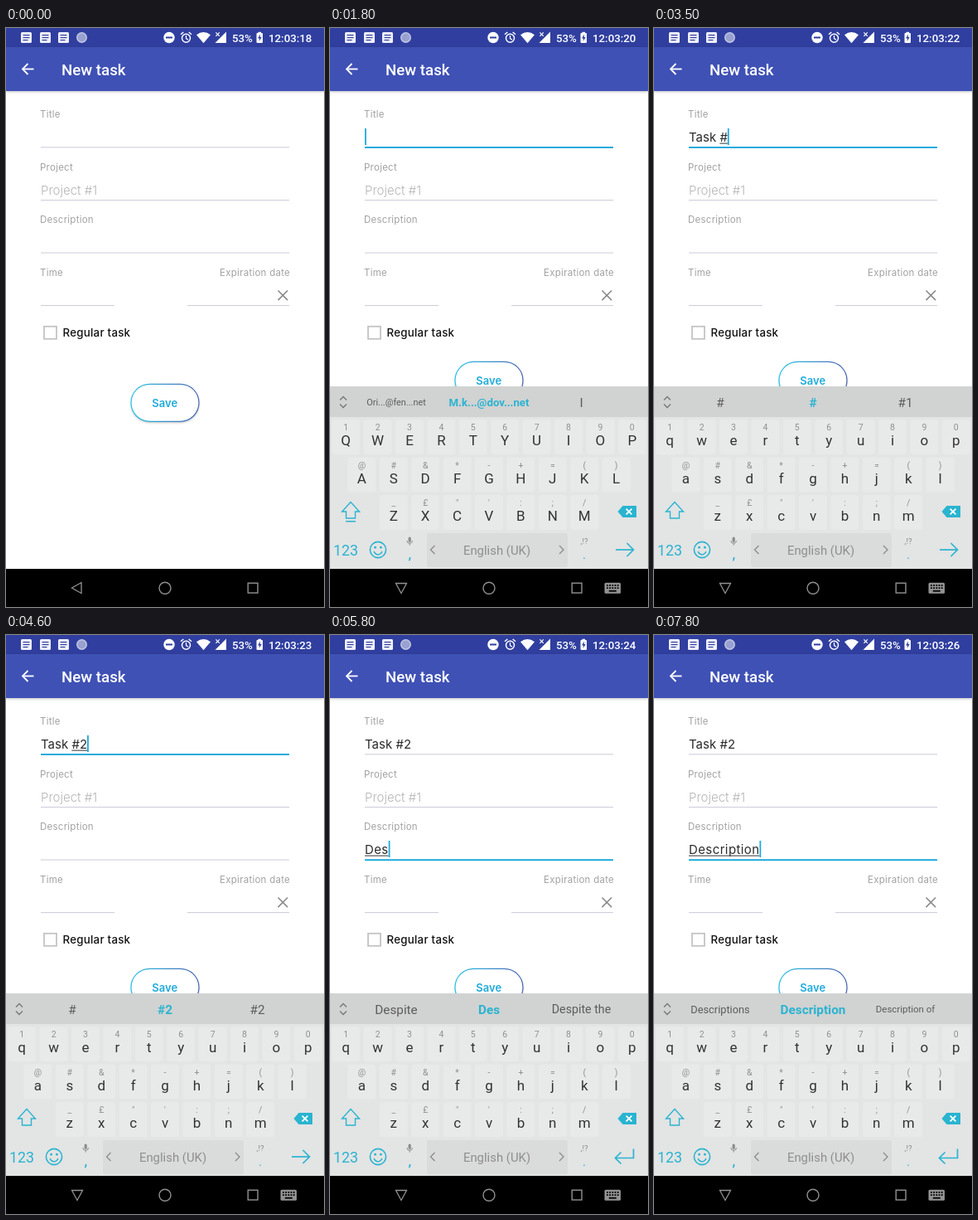
An HTML page with a canvas for the animation above (8000 ms loop, 384x698 px).

```html
<!DOCTYPE html>
<html lang="en">
<head>
<meta charset="utf-8">
<title>New task form</title>
<style>
html, body { margin: 0; width: 100%; height: 100%; overflow: hidden; background: #fff; }
canvas { display: block; width: 384px; height: 698px; }
</style>
</head>
<body>
<canvas id="stage"></canvas>
<script>
const W = 384, H = 698, LOOP = 8000;
const canvas = document.getElementById('stage');
const ctx = canvas.getContext('2d');
const ratio = window.devicePixelRatio || 1;
canvas.width = W * ratio;
canvas.height = H * ratio;

const CYAN = '#2ab4d0', LINE_CYAN = '#1eaadb', GREY = '#8b8b8b';
const FORM = 'Inter, sans-serif', SYS = 'Roboto, sans-serif';
const KEYBOARD_TOP = 432, NAV_TOP = 652;

// time, title, description, left / middle / right suggestion
const STEPS = [
  [0, '', '', '', '', ''],
  [1500, '', '', 'Ori...@fen...net', 'M.k...@dov...net', 'I'],
  [2100, 'T', '', 'The', 'T', 'This'],
  [2400, 'Ta', '', 'Take', 'Ta', 'Take the'],
  [2600, 'Tas', '', 'Task', 'Tas', 'Tasks'],
  [2800, 'Task', '', 'Tasks', 'Task', 'Tasked'],
  [3000, 'Task ', '', 'and', 'is', 'to'],
  [3400, 'Task #', '', '#', '#', '#1'],
  [3600, 'Task #2', '', '#', '#2', '#2'],
  [4900, 'Task #2', '', 'I', 'The', 'This'],
  [5400, 'Task #2', 'D', 'Do', 'D', "Don't"],
  [5600, 'Task #2', 'De', 'Dear', 'De', 'Details'],
  [5800, 'Task #2', 'Des', 'Despite', 'Des', 'Despite the'],
  [6100, 'Task #2', 'Desc', 'Description', 'Desc', 'Describe'],
  [6400, 'Task #2', 'Descr', 'Description', 'Descr', 'Describe'],
  [7000, 'Task #2', 'Descri', 'Description', 'Descri', 'Describe'],
  [7400, 'Task #2', 'Descrip', 'Descriptions', 'Descrip', 'Description of'],
  [7500, 'Task #2', 'Descript', 'Descriptions', 'Descript', 'Description of'],
  [7600, 'Task #2', 'Descripti', 'Descriptions', 'Descripti', 'Description of'],
  [7700, 'Task #2', 'Descriptio', 'Descriptions', 'Descriptio', 'Description of'],
  [7800, 'Task #2', 'Description', 'Descriptions', 'Description', 'Description of']
];
const TICKS = [200, 1300, 2300, 3300, 4400, 5400, 6300, 7400];

const last = (list, test) => list.filter(test).pop();

function rect(x, y, w, h, color) {
  ctx.fillStyle = color;
  ctx.fillRect(x, y, w, h);
}

function text(s, x, y, font, color, align = 'left', spacing = 0) {
  ctx.font = font;
  ctx.letterSpacing = spacing + 'px';
  ctx.textAlign = align;
  ctx.fillStyle = color;
  ctx.fillText(s, x, y);
}

function path(points, close) {
  ctx.beginPath();
  points.forEach(([x, y]) => ctx.lineTo(x, y));
  if (close) ctx.closePath();
}

function stroke(points, color, width = 1.5, close = false) {
  path(points, close);
  ctx.strokeStyle = color;
  ctx.lineWidth = width;
  ctx.stroke();
}

function fill(points, color) {
  path(points, true);
  ctx.fillStyle = color;
  ctx.fill();
}

function arc(x, y, r, from = 0, to = Math.PI * 2) {
  ctx.beginPath();
  ctx.arc(x, y, r, from, to);
}

function disc(x, y, r, color) {
  arc(x, y, r);
  ctx.fillStyle = color;
  ctx.fill();
}

function ring(x, y, r, color, width, from, to) {
  arc(x, y, r, from, to);
  ctx.strokeStyle = color;
  ctx.lineWidth = width;
  ctx.stroke();
}

function cross(x, y, r, color, width) {
  stroke([[x - r, y - r], [x + r, y + r]], color, width);
  stroke([[x - r, y + r], [x + r, y - r]], color, width);
}

function box(x, y, w, h, r, color) {
  ctx.beginPath();
  ctx.roundRect(x, y, w, h, r);
  ctx.fillStyle = color;
  ctx.fill();
}

function drawStatus(t) {
  const bar = '#303f9f', white = '#fff';
  rect(0, 0, W, 23, bar);
  for (const x of [18, 41, 63]) {
    box(x, 5, 13, 13, 1.5, '#f0f1fa');
    for (const y of [8, 11, 14]) rect(x + 2.5, y, y > 12 ? 6 : 8, 1.2, bar);
  }
  disc(91.5, 11.5, 6.5, '#c3c8e4');
  disc(91.5, 11.5, 5, '#98a1d0');

  disc(197, 11.5, 6.7, white);
  rect(193, 10.5, 8, 2, bar);

  ring(217.5, 12.3, 5, white, 1.5);
  stroke([[217.5, 9], [217.5, 12.6], [220, 14.2]], white, 1.2);
  stroke([[211, 7.8], [214.3, 5]], white, 1.5);
  stroke([[224, 7.8], [220.7, 5]], white, 1.5);

  ctx.beginPath();
  ctx.moveTo(238.5, 18.3);
  ctx.lineTo(230, 8.2);
  ctx.quadraticCurveTo(238.5, 1.8, 247, 8.2);
  ctx.fillStyle = white;
  ctx.fill();

  fill([[252.5, 18], [266, 18], [266, 4.5]], white);
  rect(252, 4, 7, 7, bar);
  cross(255.6, 7.6, 2.2, white, 1.2);

  text('53%', 273, 17, '500 13.3px ' + SYS, white);
  box(302.5, 6, 7.5, 12, 1, white);
  rect(304.5, 4.8, 3.5, 2, white);
  fill([[307, 7.5], [304, 12.6], [306, 12.6], [305.6, 16], [308.7, 11], [306.7, 11]], bar);
  const seconds = 18 + TICKS.filter(k => t >= k).length;
  text('12:03:' + seconds, 317, 17, '500 13.3px ' + SYS, white);
}

function drawAppBar() {
  ctx.save();
  ctx.shadowColor = 'rgba(0,0,0,.25)';
  ctx.shadowBlur = 3 * ratio;
  ctx.shadowOffsetY = ratio;
  rect(0, 23, W, 53, '#3f51b5');
  ctx.restore();
  stroke([[33.5, 49.5], [20.5, 49.5]], '#fff', 1.8);
  stroke([[26.5, 43], [20, 49.5], [26.5, 56]], '#fff', 1.8);
  text('New task', 67, 57, '500 18.7px ' + SYS, '#fff');
}

function underline(x, y, w, active) {
  if (active) rect(x, y - 1, w, 2, LINE_CYAN);
  else rect(x, y - 0.7, w, 1.1, '#cfcfdb');
}

// Text with the word in progress underlined, and a blinking caret.
function drawInput(value, y, spacing, active, caretOn) {
  const font = '400 15px ' + FORM, x = 42;
  text(value, x, y, font, '#2b2b2b', 'left', spacing);
  if (!active) return;
  const start = value.lastIndexOf(' ') + 1;
  const from = ctx.measureText(value.slice(0, start)).width;
  const end = ctx.measureText(value).width;
  if (start < value.length) rect(x + from, y + 1.6, end - from, 1, '#333');
  if (caretOn) rect(x + end, y - 16, 1.8, 20, LINE_CYAN);
}

function drawSave(lift) {
  const y = 429.3 - lift, edge = ctx.createLinearGradient(151, 0, 233, 0);
  edge.addColorStop(0, '#25c3e6');
  edge.addColorStop(1, '#4a63b4');
  ctx.save();
  ctx.shadowColor = 'rgba(0,0,0,.28)';
  ctx.shadowBlur = 3 * ratio;
  ctx.shadowOffsetY = 1.5 * ratio;
  box(151, y, 82, 45, 22.5, '#fff');
  ctx.restore();
  ctx.beginPath();
  ctx.roundRect(151, y, 82, 45, 22.5);
  ctx.strokeStyle = edge;
  ctx.lineWidth = 1.2;
  ctx.stroke();
  text('Save', 191.7, y + 27.2, '600 13px ' + FORM, LINE_CYAN, 'center');
}

function drawForm(t, step) {
  const inTitle = t >= 1500 && t < 4900, inDesc = t >= 4900;
  const caretOn = (t - step[0]) % 1000 < 500;
  const label = (s, x, y, align) => text(s, x, y, '400 11.5px ' + FORM, '#a2a2a2', align, 0.25);
  label('Title', 41, 108);
  label('Project', 41, 171.7);
  label('Description', 41, 235.3);
  label('Time', 41, 299);
  label('Expiration date', 343, 299, 'right');
  underline(42, 144, 300, inTitle);
  underline(42, 207.7, 300);
  underline(42, 271.2, 300, inDesc);
  underline(42, 334.7, 89);
  underline(219, 334.7, 123);
  text('Project #1', 42, 200.5, '300 15px ' + FORM, '#b5b5b5');
  drawInput(step[1], 137, 0, inTitle, caretOn);
  drawInput(step[2], 264, 0.4, inDesc, caretOn);
  cross(334.3, 322.3, 5.8, '#8a8a8a', 1.6);
  ctx.strokeStyle = '#c4c4c4';
  ctx.lineWidth = 1.8;
  ctx.strokeRect(46, 359.8, 15, 15);
  text('Regular task', 68.5, 372.3, '500 13.3px ' + FORM, '#111', 'left', 0.25);

  ctx.save();
  if (t >= 1600) {
    ctx.beginPath();
    ctx.rect(0, 76, W, KEYBOARD_TOP - 76);
    ctx.clip();
  }
  drawSave(t >= 1600 ? 27 : 0);
  ctx.restore();
}

function suggestion(s, x, middle) {
  const weight = middle ? '700 ' : '400 ', room = middle ? 97 : 71.5;
  ctx.font = weight + '15.3px ' + SYS;
  ctx.letterSpacing = '0px';
  const size = 15.3 * Math.min(1, room / ctx.measureText(s).width);
  text(s, x, 451 + size * 0.36, weight + size + 'px ' + SYS, middle ? CYAN : '#5c5c5c', 'center');
}

function keyRow(letters, hints, x0, y, caps) {
  [...letters].forEach((c, i) => {
    const x = x0 + i * 38.4;
    box(x - 17, y - 25, 34, 42, 3, '#e8e9e9');
    text(hints[i], x, y - 12, '400 10.5px ' + SYS, '#909090', 'center');
    text(caps ? c.toUpperCase() : c, x, y + 6, '400 17px ' + SYS, '#333', 'center');
  });
}

function drawSmiley(x, y) {
  ring(x, y, 9.6, CYAN, 1.6);
  disc(x - 3.4, y - 2.8, 1.4, CYAN);
  disc(x + 3.4, y - 2.8, 1.4, CYAN);
  ring(x, y + 0.5, 5.2, CYAN, 1.5, 0.3, Math.PI - 0.3);
}

function drawKeyboard(t, step) {
  const p = Math.min(1, Math.max(0, (t - 1650) / 130));
  if (!p) return;
  const caps = t < 2100 || (t >= 5000 && t < 5400);
  ctx.save();
  ctx.beginPath();
  ctx.rect(0, KEYBOARD_TOP, W, NAV_TOP - KEYBOARD_TOP);
  ctx.clip();
  ctx.globalAlpha = p;
  ctx.translate(0, 60 * (1 - p) ** 2);

  rect(0, KEYBOARD_TOP, W, 220, '#e3e4e4');
  rect(0, KEYBOARD_TOP, W, 37, '#d1d2d2');
  stroke([[12, 448.5], [16, 444.5], [20, 448.5]], '#777', 1.4);
  stroke([[12, 453.5], [16, 457.5], [20, 453.5]], '#777', 1.4);
  suggestion(step[3], 80, false);
  suggestion(step[4], 192, true);
  suggestion(step[5], 303.5, false);

  keyRow('qwertyuiop', '1234567890', 19.2, 497, caps);
  keyRow('asdfghjkl', '@#&*-+=()', 38.4, 542.5, caps);
  keyRow('zxcvbnm', '_£"\':;/', 76.8, 588, caps);

  stroke([[25, 571.5], [14.5, 583], [19.5, 583], [19.5, 591], [30.5, 591], [30.5, 583], [35.5, 583]], CYAN, 1.4, true);
  if (caps) stroke([[19, 594.8], [31, 594.8]], CYAN, 1.5);
  fill([[347.5, 583], [353.5, 576], [370, 576], [370, 590], [353.5, 590]], CYAN);
  cross(361, 583, 3.4, '#fff', 1.7);

  text('123', 4, 635.5, '400 17.8px ' + SYS, CYAN);
  drawSmiley(58, 629);
  box(94.6, 613.5, 3.2, 6.4, 1.6, GREY);
  ring(96.2, 618, 3.3, GREY, 1, 0, Math.PI);
  rect(95.7, 621.3, 1, 2.4, GREY);
  text(',', 96.4, 640, '500 17px ' + SYS, CYAN, 'center');
  box(117, 609, 170, 41, 3, '#dadbdb');
  stroke([[126.5, 624], [121.5, 629], [126.5, 634]], GREY, 1.3);
  stroke([[277, 624], [282, 629], [277, 634]], GREY, 1.3);
  text('English (UK)', 201.5, 634.6, '400 14.9px ' + SYS, '#8e8e8e', 'center');
  text(',!?', 307, 622, '400 9.5px ' + SYS, GREY, 'center');
  text('.', 307, 640, '400 15px ' + SYS, CYAN, 'center');
  if (t < 5000) {
    stroke([[345, 629], [366, 629]], CYAN, 1.7);
    stroke([[358.5, 621], [366.5, 629], [358.5, 637]], CYAN, 1.7);
  } else {
    stroke([[366.5, 619.5], [366.5, 630.5], [345, 630.5]], CYAN, 1.7);
    stroke([[351.5, 623.5], [344.5, 630.5], [351.5, 637.5]], CYAN, 1.7);
  }
  ctx.restore();
}

function drawNav(t) {
  const open = t >= 1600, color = '#929292';
  rect(0, NAV_TOP, W, H - NAV_TOP, '#000');
  const tri = open ? [[79.5, 669.5], [92.5, 669.5], [86, 681.5]] : [[91, 668.5], [91, 681.5], [79.5, 675]];
  stroke(tri, color, 1.3, true);
  ring(192, 675.2, 7, color, 1.4);
  ctx.strokeRect(292.2, 669.2, 11.8, 11.8);
  if (!open) return;
  box(331.5, 668.7, 19.5, 13, 1.5, color);
  for (let row = 0; row < 2; row++)
    for (let i = 0; i < 5; i++) rect(334 + i * 3.2, 671 + row * 3.2, 1.8, 1.8, '#000');
  rect(336.8, 677.8, 9, 1.8, '#000');
}

function draw() {
  const t = (performance.now() + 15) % LOOP;
  const step = last(STEPS, s => t >= s[0]);
  ctx.setTransform(ratio, 0, 0, ratio, 0, 0);
  rect(0, 0, W, H, '#fff');
  drawForm(t, step);
  drawStatus(t);
  drawAppBar();
  drawKeyboard(t, step);
  drawNav(t);
  requestAnimationFrame(draw);
}
draw();
</script>
</body>
</html>
```
